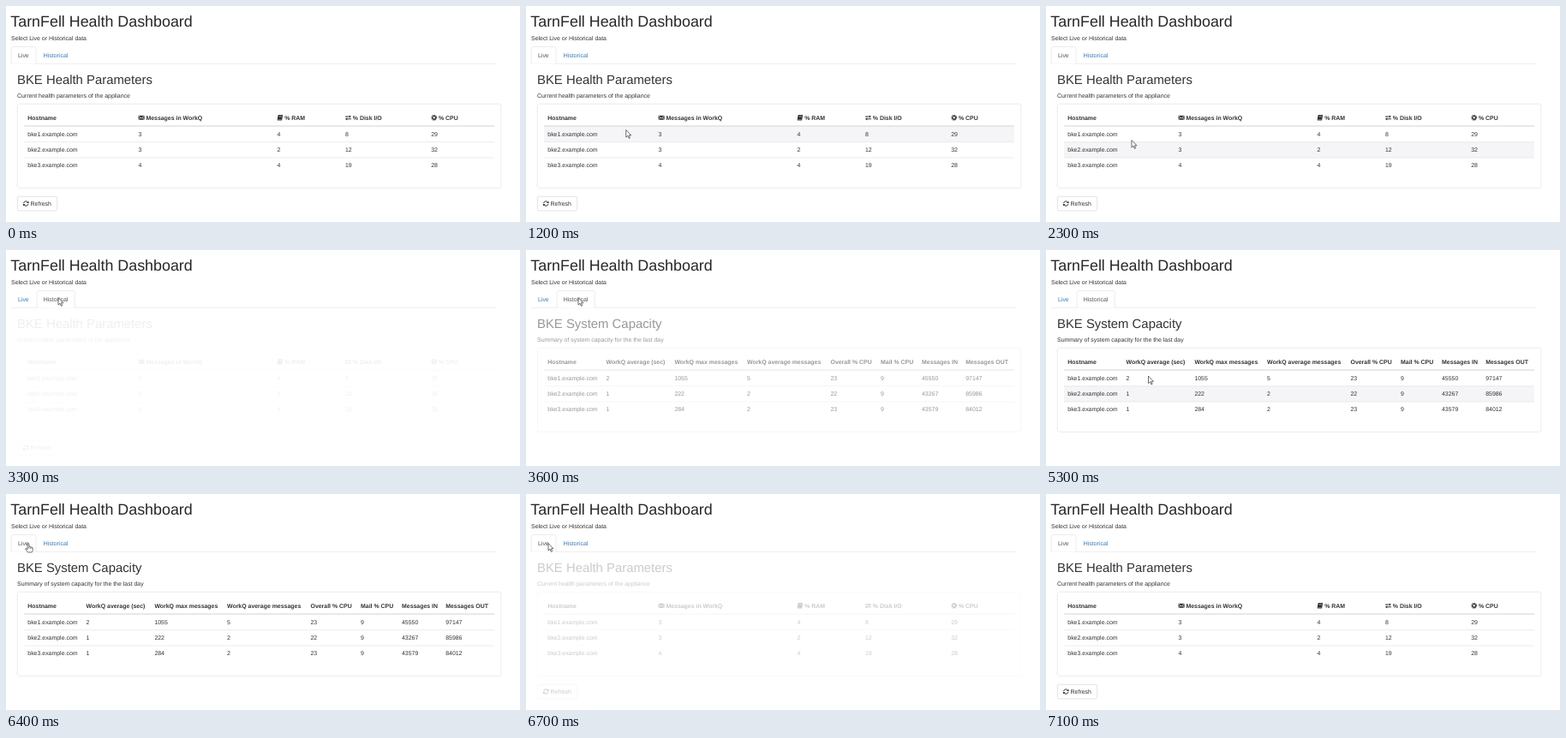
Write an HTML page that moves like this. It is 600 px wide and 252 px high and loops after 7900 ms.

```html
<!DOCTYPE html>
<html lang="en">
<head>
<meta charset="utf-8">
<title>Health Dashboard</title>
<style>
  html, body { margin: 0; width: 100%; height: 100%; overflow: hidden; background: #fff; }
  svg { display: block; width: 600px; height: 252px; }
  text {
    font: 6.945px "Liberation Sans", Arial, sans-serif;
    fill: #333;
    text-rendering: geometricPrecision;
  }
  .h1 { font-size: 17.86px; fill: #262626; }
  .h2 { font-size: 14.88px; }
  .b { font-weight: bold; }
  .line { stroke: #ddd; stroke-width: .55; fill: none; }
  .head { stroke-width: 1; }
</style>
</head>
<body>
<svg id="stage" viewBox="0 0 600 252"></svg>
<script>
const LOOP = 7900, STEP = 100;
const LAG = 80;                       // the page reacts a little after the pointer
const TO_HIST = 3200, TO_LIVE = 6400; // tab clicks
const TOP = 140.4, ROW = 18.3;        // first table row and row height

const text = (x, y, s, cls = '') => `<text x="${x}" y="${y}" class="${cls}">${s}</text>`;
const at = (x, y, body) => `<g transform="translate(${x} ${y})">${body}</g>`;

// Icons live in a 7 x 7 box
const icons = {
  mail: `<path d="M0 1h7v5H0z" fill="#333"/>
    <path d="M0 1.3 3.5 4.2 7 1.3M.2 5.9 2.4 3.5M6.8 5.9 4.6 3.5" fill="none" stroke="#fff" stroke-width=".7"/>`,
  book: `<path d="M1.8.2H6.7L5.7 6.8H.8Q0 6.5.3 5.6L1.1 1Q1.3.3 1.8.2z" fill="#333"/>
    <path d="M2.5 1.5H5.5M2.3 2.5H5.3M.9 5.9H5.2" stroke="#fff" stroke-width=".35"/>`,
  swap: `<path d="M0 1.7H4.8V.6L7 2.2 4.8 3.8V2.7H0zM7 4.5H2.2V3.4L0 5 2.2 6.6V5.5H7z" fill="#333"/>`,
  cog: `<circle cx="3.5" cy="3.5" r="1.9" fill="none" stroke="#333" stroke-width="1.4"/>
    <circle cx="3.5" cy="3.5" r="2.9" fill="none" stroke="#333" stroke-width="1.1" stroke-dasharray="1.15 1.128"/>`,
  refresh: `<path d="M.8 3.1A2.7 2.7 0 0 1 5.7 2M6.2 3.9A2.7 2.7 0 0 1 1.3 5" fill="none" stroke="#333"/>
    <path d="M6.8.4V3.1H4.1zM.2 6.6V3.9H2.9z" fill="#333"/>`
};

const cursors = {
  arrow: `<path d="M0 0V8.6L2 6.8 3.4 9.9 4.7 9.3 3.3 6.3H6z" fill="#fff" stroke="#333" stroke-width=".7"/>`,
  beam: `<path d="M-1.5-4.5H1.5M0-4.5V4.5M-1.5 4.5H1.5" fill="none" stroke="#333" stroke-width=".8"/>`,
  hand: `<path d="M-.9.6Q0-.5.9.6V4Q2 3.4 2.4 4.3 3.5 3.8 3.9 4.7 5.2 4.4 5.2 5.7V8Q5 9.4 4.2 10.5H-.6Q-1.4 9-3.2 7
    -3.4 5.8-2.2 6.1L-.9 7.3z" fill="#fff" stroke="#333" stroke-width=".7"/>
    <path d="M.9 4V6.3M2.4 4.4V6.3M3.9 4.8V6.4" stroke="#333" stroke-width=".5"/>`
};

function pane(id, title, note, cols, heads, rows, extra = '') {
  const cells = rows.map((data, r) => {
    const y = TOP + r * ROW;
    return `<rect class="row" x="21" y="${y}" width="549" height="${ROW}" fill="#f5f4f6" visibility="hidden"/>
      <path class="line" d="M21 ${y}H570"/>` +
      [`bke${r + 1}.example.com`, ...data.split(' ')].map((s, c) => text(cols[c], y + 11.2, s)).join('');
  }).join('');
  const head = heads.map((h, c) => {
    const [label, icon] = h.split('|');
    return icon
      ? at(cols[c], 126.8, icons[icon]) + text(cols[c] + 8.8, 132.6, label, 'b')
      : text(cols[c], 132.6, label, 'b');
  }).join('');
  return `<g id="${id}">${text(13, 91, title, 'h2')}${text(13, 106.5, note)}
    <rect class="line" x="13.3" y="114.2" width="564.5" height="98" rx="2"/>
    ${cells}<path class="line head" d="M21 139.9H570"/>${head}${extra}</g>`;
}

const tabs = { tabLive: [6.2, 28.8, 'Live'], tabHist: [36, 44.2, 'Historical'] };
const tab = (id, [x, w, label]) =>
  `<g id="${id}"><path class="line" d="M${x} 67.6V49.5q0-2 2-2h${w - 4}q2 0 2 2V67.6"/>${text(x + 7.8, 60, label)}</g>`;

const button = '<rect class="line" x="13.3" y="222.3" width="46.4" height="16.6" rx="2" style="stroke:#ccc"/>' +
  at(19.8, 227, icons.refresh) + text(28.6, 233.1, 'Refresh');

document.getElementById('stage').innerHTML =
  text(5.3, 24, 'TarnFell Health Dashboard', 'h1') +
  text(6, 39.5, 'Select Live or Historical data') +
  '<path class="line" d="M6 67.3H572"/>' +
  Object.keys(tabs).map(id => tab(id, tabs[id])).join('') +
  pane('live', 'BKE Health Parameters', 'Current health parameters of the appliance',
    [25.3, 154.6, 316.4, 396, 496.2],
    ['Hostname', 'Messages in WorkQ|mail', '% RAM|book', '% Disk I/O|swap', '% CPU|cog'],
    ['3 4 8 29', '3 2 12 32', '4 4 19 28'], button) +
  pane('hist', 'BKE System Capacity', 'Summary of system capacity for the the last day',
    [25.3, 93.5, 173.4, 258, 355.5, 414, 462, 513.2],
    ['Hostname', 'WorkQ average (sec)', 'WorkQ max messages', 'WorkQ average messages',
      'Overall % CPU', 'Mail % CPU', 'Messages IN', 'Messages OUT'],
    ['2 1055 5 23 9 45550 97147', '1 222 2 22 9 43267 85986', '1 284 2 23 9 43579 84012']) +
  `<g id="pointer">${Object.keys(cursors).map(k => `<g id="${k}">${cursors[k]}</g>`).join('')}</g>`;

// Pointer stops: time, x, y
const stops = [
  [100, 150, 22], [700, 128, 122], [1500, 110, 158], [1800, 103, 181], [2200, 102, 181],
  [2300, 100, 156.5], [2900, 61, 55.5], [3800, 61, 55.5], [4400, 137.5, 132.5],
  [5100, 119, 181], [5300, 119.5, 147], [6200, 26, 57.5], [LOOP, 26, 57.5]
];

function pointer(t) {
  const i = Math.max(1, stops.findIndex(s => s[0] > t));
  const [a, b] = [stops[i - 1], stops[i]];
  const p = Math.max(0, (t - a[0]) / (b[0] - a[0]));
  return [a[1] + (b[1] - a[1]) * p, a[2] + (b[2] - a[2]) * p];
}

const $ = id => document.getElementById(id);
const show = (el, on) => el.setAttribute('visibility', on ? 'visible' : 'hidden');
const clamp = v => Math.min(1, Math.max(0, v));
const fadeOut = dt => clamp(1 - dt / 108);
const fadeIn = dt => clamp((dt - 200) / 400);
const activeTab = t => t >= TO_HIST && t < TO_LIVE ? 'tabHist' : 'tabLive';

function draw(t) {
  const [x, y] = pointer(t);
  const active = activeTab(t);
  const over = Object.keys(tabs).find(id => y > 47 && y < 67 && x > tabs[id][0] && x < tabs[id][0] + tabs[id][1]);

  for (const id in tabs) {
    const [box, label] = $(id).children;
    show(box, id === active || id === over);
    box.style.fill = id === active ? '#fff' : '#eee';
    label.style.fill = id === active ? '#555' : '#337ab7';
  }

  const row = Math.floor((pointer(t - LAG)[1] - TOP) / ROW);
  const alpha = {
    live: Math.max(fadeOut(t - TO_HIST), fadeIn(t - TO_LIVE)),
    hist: fadeIn(t - TO_HIST) * fadeOut(t - TO_LIVE)
  };
  for (const id in alpha) {
    $(id).style.opacity = alpha[id];
    $(id).querySelectorAll('.row').forEach((r, i) => show(r, i === row));
  }

  const onHead = active === 'tabHist' && y > 126 && y < 138;
  const kind = over && over !== activeTab(t - LAG) ? 'hand' : onHead ? 'beam' : 'arrow';
  $('pointer').setAttribute('transform', `translate(${x} ${y})`);
  for (const k in cursors) show($(k), k === kind && t >= 100 && t < 7000);
}

function tick() {
  const t = performance.now() % LOOP;
  draw(Math.floor(t / STEP) * STEP);
  requestAnimationFrame(tick);
}
tick();
</script>
</body>
</html>
```
